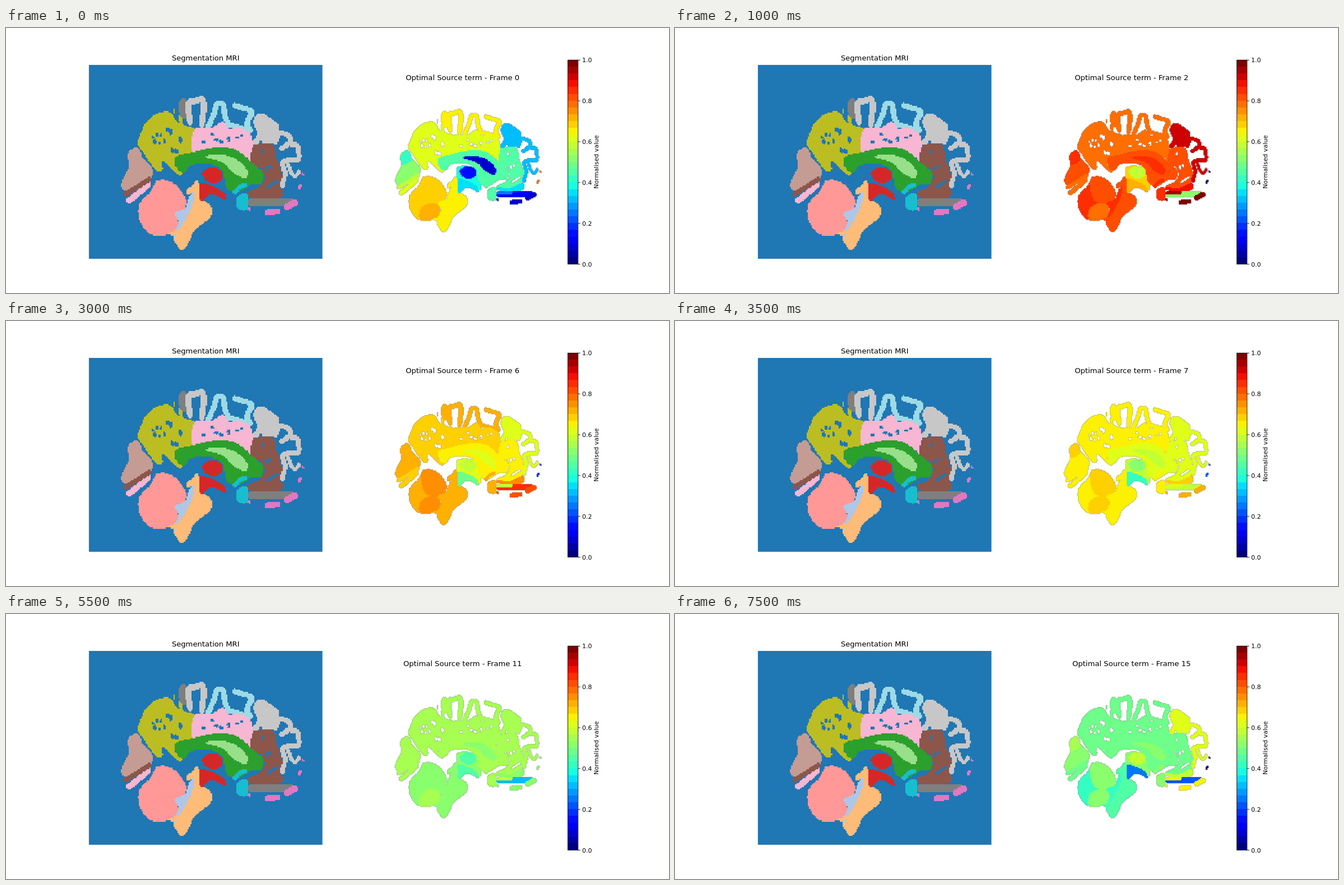
An HTML page with a canvas that plays this animation: 1183 by 473 pixels, repeating every 8 s.

```html
<!DOCTYPE html>
<html lang="en">
<head>
<meta charset="utf-8">
<style>
html, body { margin: 0; width: 100%; height: 100%; overflow: hidden; background: #fff; }
canvas, svg { position: absolute; left: 0; top: 0; width: 1183px; height: 473px; }
text { font: 10.95px "DejaVu Sans", sans-serif; fill: #000; }
.title { font-size: 13.14px; text-anchor: middle; }
</style>
</head>
<body>
<canvas id="stage" width="1183" height="473"></canvas>
<svg viewBox="0 0 1183 473">
  <text class="title" x="356.25" y="58.1">Segmentation MRI</text>
  <text class="title" id="caption" x="814.65" y="92.8">Optimal Source term - Frame 0</text>
  <text transform="translate(1057.3 239) rotate(-90)" text-anchor="middle">Normalised value</text>
  <g id="scale"></g>
</svg>
<script>
const STEP = 500, COUNT = 16, BANDS = 30;
const COLS = 182, ROWS = 151;
const LEFT = { x: 147.9, y: 65.9, w: 416.7, h: 346 };
const RIGHT = { x: 648, y: 100.5, w: 333.4, h: 276.8 };
const BAR = { x: 1002.2, y: 56.8, w: 18.2, h: 364.4 };
const BLUE = '#1f77b4', OLIVE = '#bcbd22', SILVER = '#c7c7c7', GREY = '#7f7f7f', BROWN = '#8c564b',
  ROSE = '#f7b6d2', SKY = '#9edae5', GREEN = '#2ca02c', LIME = '#98df8a', RED = '#d62728', TEAL = '#17becf',
  MAGENTA = '#e377c2', TAN = '#c49c94', SALMON = '#ff9896', ORANGE = '#ffbb78', ICE = '#aec7e8';

// Activity in percent at the key steps; other tissue is a mix of cortex with one of these
const KEYS = [0, 2, 4, 6, 9, 13, 15];
const activity = {
  cortex: [60, 78, 59, 68, 55, 54, 48],
  frontal: [30, 92, 61, 61, 66, 47, 62],
  ventricle: [7, 86, 57, 63, 50, 56, 53],
  thalamus: [15, 57, 50, 57, 38, 55, 57],
  basal: [35, 73, 47, 47, 36, 56, 26],
  band: [13, 50, 55, 86, 1, 65, 20],
  pole: [8, 99, 54, 82, 55, 48, 66],
  speck: [78, 3, 95, 20, 22, 80, 1],
  hind: [68, 85, 59, 73, 52, 53, 41],
  vermis: [67, 82, 58, 74, 56, 46, 52],
  nodule: [72, 79, 63, 76, 55, 53, 52]
};

const cellW = LEFT.w / COLS, cellH = LEFT.h / ROWS;
const grid = document.createElement('canvas');
grid.width = COLS;
grid.height = ROWS;
const cells = grid.getContext('2d', { willReadFrequently: true });
const labels = new Uint8Array(COLS * ROWS);
const regions = [];

// Smooth curve through the points
function curve(text, closed) {
  const pts = text.split(' ').map(p => p.split(',').map(Number)), n = pts.length;
  const at = i => pts[closed ? (i + n) % n : Math.max(0, Math.min(n - 1, i))];
  const path = new Path2D();
  path.moveTo(...pts[0]);
  for (let i = 0; i < (closed ? n : n - 1); i++) {
    const [a, b, c, d] = [at(i - 1), at(i), at(i + 1), at(i + 2)];
    path.bezierCurveTo(b[0] + (c[0] - a[0]) / 7, b[1] + (c[1] - a[1]) / 7,
      c[0] - (d[0] - b[0]) / 7, c[1] - (d[1] - b[1]) / 7, ...c);
  }
  return path;
}

const blob = text => () => cells.fill(curve(text, true));
const fold = (width, text) => () => {
  cells.lineWidth = width;
  cells.stroke(curve(text, false));
};
const oval = (x, y, rx, ry, turn = 0) => () => {
  cells.beginPath();
  cells.ellipse(x, y, rx, ry, turn, 0, 7);
  cells.fill();
};

// Mark every cell that the shapes mostly cover
function stamp(label, shapes, allowed = () => true) {
  cells.setTransform(1, 0, 0, 1, 0, 0);
  cells.clearRect(0, 0, COLS, ROWS);
  cells.setTransform(1 / cellW, 0, 0, 1 / cellH, -LEFT.x / cellW, -LEFT.y / cellH);
  cells.lineCap = cells.lineJoin = 'round';
  cells.fillStyle = cells.strokeStyle = '#000';
  shapes.forEach(draw => draw());
  const { data } = cells.getImageData(0, 0, COLS, ROWS);
  labels.forEach((old, k) => { if (data[4 * k + 3] > 127 && allowed(old)) labels[k] = label; });
}

function tissue(colour, kind, share, ...shapes) {
  const values = activity.cortex.map((v, i) => (v + (activity[kind][i] - v) * share) / 100);
  regions.push({ colour, values });
  stamp(regions.length, shapes);
}

let seed = 11;
const random = () => (seed = seed * 16807 % 2147483647) / 2147483647;

// Scatter small sulci over the tissue drawn last
function sulci(count, x, y, w, h, rx, ry) {
  const own = regions.length;
  for (let i = 0; i < count; i++) {
    const size = .7 + .6 * random();
    const px = x + w * (i + random()) / count, py = y + h * random();
    stamp(0, [oval(px, py, rx * size, ry * size, random() - .5)], old => old === own);
  }
}

// Parietal and paracentral cortex
tissue(OLIVE, 'cortex', 1,
  blob('234,206 240,190 248,171 266,154 284,149 296,153 304,167 319,174 337,182 335,221 304,229 302,246 316,260 306,261 290,246 280,236 279,256 268,254 252,234 245,221'),
  fold(4, '300,146 300,151'), fold(6, '310,157 314,174'));
sulci(13, 260, 182, 52, 40, 2.4, 4.5);
tissue(GREY, 'nodule', .3, blob('310,129 321,127 323,160 316,162 309,150'));
tissue(SILVER, 'nodule', .3, fold(11, '329,168 326,150 326,134 338,130 351,128 352,150 349,172'));
tissue(SKY, 'nodule', .4,
  fold(10, '361,175 370,156 376,136 387,136 391,158 398,174'),
  fold(10, '408,138 420,142 439,149 434,160 430,172 436,183'),
  fold(8, '400,173 412,175 428,181'));
tissue(ROSE, 'cortex', 1,
  blob('336,181 366,179 386,167 398,180 416,178 438,192 440,238 426,228 400,216 372,213 334,222'));
sulci(8, 352, 190, 74, 14, 4, 2.6);

// Frontal lobe
tissue(SILVER, 'frontal', 1,
  blob('444,158 458,153 486,172 484,187 474,207 460,208 455,200 449,210 440,204 448,188 442,172'),
  fold(9, '481,204 488,188 503,191 507,203 492,215'),
  fold(9, '510,208 520,211 522,234 510,235 494,240 498,260 493,281'),
  fold(7, '502,240 509,258 516,265 523,256'));
tissue(BROWN, 'ventricle', .3,
  blob('440,212 460,206 478,210 484,236 493,262 489,282 493,299 470,304 436,299 432,292 452,284 461,268 456,252 438,242'));
sulci(4, 450, 214, 32, 66, 2, 3.5);
stamp(0, [fold(4, '466,285 476,278 486,273')]);
tissue(BROWN, 'pole', .5, blob('434,295 460,297 486,287 493,290 490,302 462,306 434,302'));

// Deep structures
tissue(BLUE, 'thalamus', .45, blob('342,254 353,248 387,252 392,281 398,287 395,303 370,285 345,281'));
tissue(GREEN, 'ventricle', .27,
  blob('301,240 304,229 340,220 380,212 412,218 440,242 458,258 456,277 436,280 418,292 404,293 392,282 386,254 364,243 332,244 318,259 306,252'));
tissue(LIME, 'ventricle', 1, blob('355,230 384,226 412,235 432,256 426,268 408,260 388,241'));
tissue(RED, 'thalamus', 1, oval(368.5, 262.5, 18.5, 14, .1));
tissue(RED, 'basal', 1, blob('345,278 366,281 388,294 392,308 376,299 362,298 347,309'));
tissue(TEAL, 'pole', .27, fold(8, '408,293 417,284 426,280'), blob('414,299 430,296 432,323 416,325 411,312'));
tissue(GREY, 'band', 1, fold(13, '438,312 470,311 490,312 508,311'));
tissue(GREY, 'frontal', 1.2, fold(6, '435,308 466,307'));
tissue(MAGENTA, 'pole', 1, fold(12, '502,319 515,312'), fold(11, '466,329 485,327'), fold(5, '435,322 435,324'));
tissue(MAGENTA, 'speck', 1, fold(5, '525,281 524,286'), fold(3, '530,260 530,262'));

// Occipital lobe
tissue(TAN, 'pole', .18, blob('218,223 234,212 242,230 260,248 260,266 232,284 216,294 206,282 212,262 220,247'));
tissue(TAN, 'pole', .35, blob('218,224 234,212 243,234 222,246'));
tissue(ROSE, 'cortex', 1, fold(11, '220,308 236,295 253,279'));
tissue(BROWN, 'pole', .06, fold(9, '214,296 234,284 256,270'));

// Cerebellum and stem
tissue(SALMON, 'hind', 1,
  blob('238,314 258,292 268,273 288,272 306,283 321,306 316,326 301,333 308,348 300,363 276,371 254,366 238,342'));
tissue(SALMON, 'vermis', 1, blob('263,286 269,273 288,272 306,283 321,306 316,326 296,332 272,324'));
tissue(SALMON, 'nodule', 1, blob('261,346 274,334 298,332 308,348 300,363 276,371 260,366'));
tissue(ICE, 'hind', .8, blob('340,284 326,304 320,321 301,331 308,346 299,366 301,378 322,344 338,318'));
tissue(ORANGE, 'hind', .6,
  blob('341,271 345,282 346,306 356,310 367,320 365,338 350,350 336,362 326,384 317,396 310,394 300,380 304,368 320,342 333,314 336,292 324,299 322,290 332,281'),
  blob('288,367 305,361 301,370'));

// Thin contour between tissue and background
const contour = new Path2D();
const stepX = RIGHT.w / COLS, stepY = RIGHT.h / ROWS;
labels.forEach((label, k) => {
  const x = RIGHT.x + k % COLS * stepX, y = RIGHT.y + Math.floor(k / COLS) * stepY;
  if (!label !== !labels[k - 1]) { contour.moveTo(x, y); contour.lineTo(x, y + stepY); }
  if (!label !== !labels[k - COLS]) { contour.moveTo(x, y); contour.lineTo(x + stepX, y); }
});

const clamp = v => Math.max(0, Math.min(1, v));

// Jet colour map in even bands
function jet(value) {
  const v = clamp(Math.floor(value * BANDS) / (BANDS - 1));
  const r = v < .89 ? (v - .35) / .31 : 1 - (v - .89) / .22;
  const g = v < .5 ? (v - .125) / .25 : (.91 - v) / .27;
  const b = v < .2 ? .5 + v / .22 : (.65 - v) / .31;
  return `rgb(${[r, g, b].map(u => Math.round(255 * clamp(u)))})`;
}

function valueAt(values, step) {
  let i = 0;
  while (i < KEYS.length - 2 && step > KEYS[i + 1]) i++;
  const u = (step - KEYS[i]) / (KEYS[i + 1] - KEYS[i]);
  return values[i] + (values[i + 1] - values[i]) * u;
}

const ctx = document.getElementById('stage').getContext('2d');
const caption = document.getElementById('caption');
ctx.imageSmoothingEnabled = false;

function drawMap(box, colours) {
  cells.setTransform(1, 0, 0, 1, 0, 0);
  cells.clearRect(0, 0, COLS, ROWS);
  labels.forEach((label, k) => {
    if (!label) return;
    cells.fillStyle = colours[label - 1];
    cells.fillRect(k % COLS, Math.floor(k / COLS), 1, 1);
  });
  ctx.drawImage(grid, box.x, box.y, box.w, box.h);
}

function drawScale() {
  for (let i = 0; i < BANDS; i++) {
    const y0 = Math.round(BAR.y + BAR.h * (1 - (i + 1) / BANDS));
    const y1 = Math.round(BAR.y + BAR.h * (1 - i / BANDS));
    ctx.fillStyle = jet((i + .5) / BANDS);
    ctx.fillRect(BAR.x, y0, BAR.w, y1 - y0);
  }
  ctx.strokeStyle = '#000';
  ctx.lineWidth = .88;
  ctx.strokeRect(BAR.x + .4, BAR.y + .4, BAR.w, BAR.h);
  let marks = '';
  for (let i = 0; i <= 5; i++) {
    const y = BAR.y + .4 + BAR.h * (1 - i / 5);
    marks += `<path d="M1020.8 ${y}h3.9" stroke="#000" stroke-width=".88"/>` +
      `<text x="1028.1" y="${y + 4}">${(i / 5).toFixed(1)}</text>`;
  }
  document.getElementById('scale').innerHTML = marks;
}

function drawStep(step) {
  ctx.fillStyle = '#fff';
  ctx.fillRect(640, 100, 350, 290);
  drawMap(RIGHT, regions.map(r => jet(valueAt(r.values, step))));
  ctx.strokeStyle = 'rgba(128,128,128,.75)';
  ctx.lineWidth = .6;
  ctx.stroke(contour);
  caption.textContent = 'Optimal Source term - Frame ' + step;
}

ctx.fillStyle = BLUE;
ctx.fillRect(LEFT.x, LEFT.y, LEFT.w, LEFT.h);
drawMap(LEFT, regions.map(r => r.colour));
drawScale();

const start = performance.now();
let shown = -1;
function tick() {
  const step = Math.floor((performance.now() - start) / STEP) % COUNT;
  if (step !== shown) drawStep(shown = step);
  requestAnimationFrame(tick);
}
tick();
</script>
</body>
</html>
```
